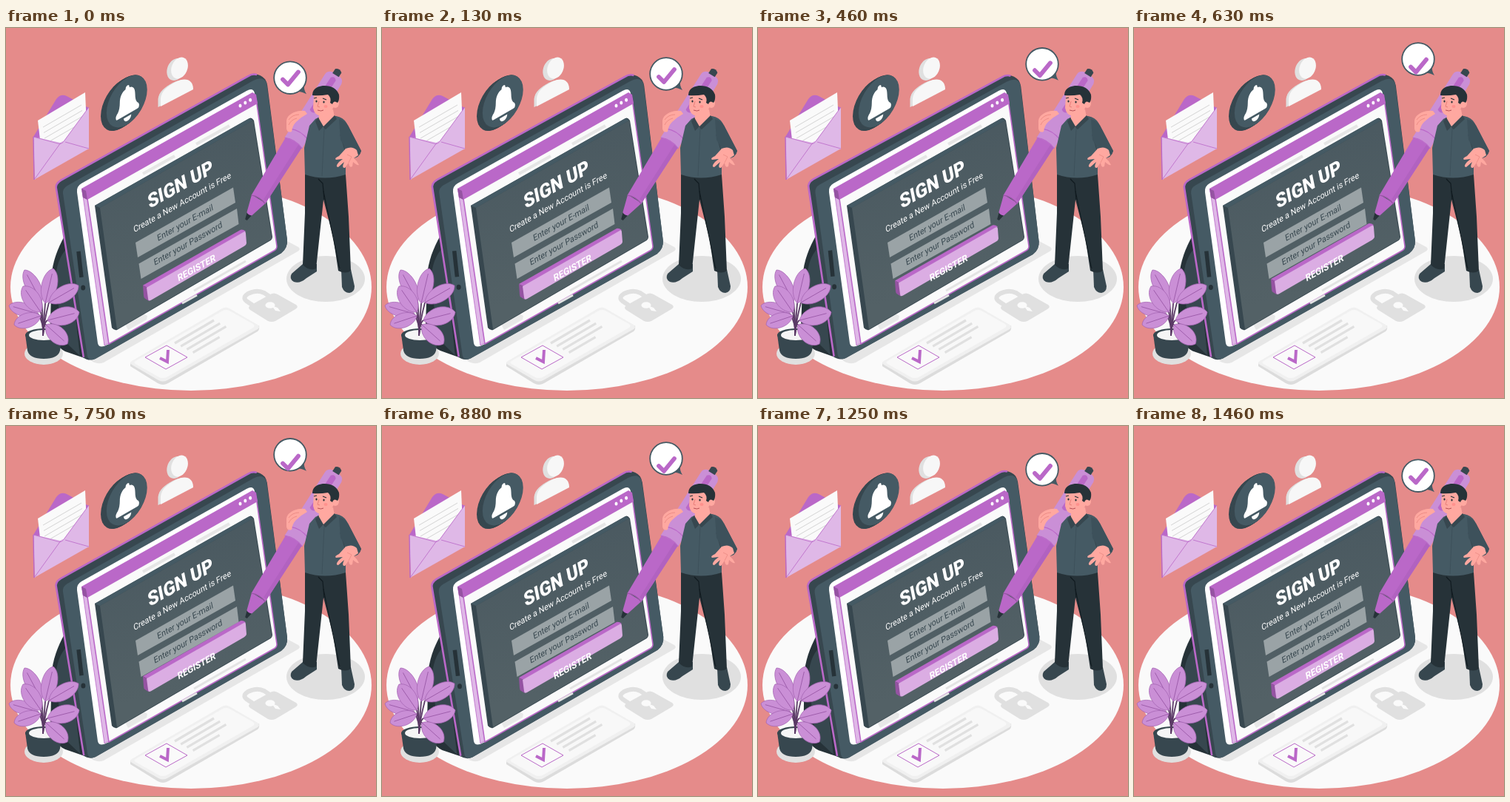
Animation, 500 px wide and 500 px high, one loop 1500 ms. Source, as an HTML page with a canvas:

```html
<!DOCTYPE html>
<html lang="en">
<head>
<meta charset="utf-8">
<title>Sign up</title>
<style>
html, body { margin: 0; width: 100%; height: 100%; overflow: hidden; background: #e58b8a; }
canvas { display: block; width: 500px; height: 500px; }
</style>
</head>
<body>
<canvas id="stage" width="500" height="500"></canvas>
<script>
const ctx = document.getElementById('stage').getContext('2d');
const LOOP = 1500;
const PURPLE = '#ba68c8', LILAC = '#ca8fd6', PALE = '#dfb8e7', PLUM = '#9553a2';
const SLATE = '#455a64', DARK = '#37474f', INK = '#263238', SKIN = '#ffa8a0', GREY = '#e0e0e0';

function shape(d, fill, stroke, width = 1) {
  const p = new Path2D(d);
  if (fill) { ctx.fillStyle = fill; ctx.fill(p); }
  if (stroke) { ctx.strokeStyle = stroke; ctx.lineWidth = width; ctx.stroke(p); }
}
const line = (d, color, width) => shape(d, null, color, width);

function oval(x, y, rx, ry, fill, stroke, width = 1, turn = 0) {
  ctx.beginPath();
  ctx.ellipse(x, y, rx, ry, turn, 0, Math.PI * 2);
  if (fill) { ctx.fillStyle = fill; ctx.fill(); }
  if (stroke) { ctx.strokeStyle = stroke; ctx.lineWidth = width; ctx.stroke(); }
}

function placed(matrix, draw) {
  ctx.save();
  ctx.transform(...matrix);
  draw();
  ctx.restore();
}
const lifted = (lift, draw) => placed([1, 0, 0, 1, 0, -lift], draw);

// Text lying in the plane of the tilted screen, centred on (x, y).
function label(text, x, y, font, color) {
  placed([0.866, -0.49, 0.2, 0.98, x, y], () => {
    ctx.font = font + ' Roboto, sans-serif';
    ctx.textAlign = 'center';
    ctx.textBaseline = 'alphabetic';
    ctx.fillStyle = color;
    ctx.fillText(text, 0, ctx.measureText('E').actualBoundingBoxAscent / 2);
  });
}

function floor() {
  ctx.fillStyle = '#e58b8a';
  ctx.fillRect(0, 0, 500, 500);
  oval(250, 350, 244, 140, '#fafafa');
  shape('M112 447L380 288L395 296Q399 299 394 302L132 452Q122 456 112 447Z', '#e6e6e6');
  oval(432, 339, 53, 31, GREY);
  oval(51, 440, 26, 15, GREY);
}

function card() {
  shape('M168 452V457L205 480Q212 484 219 480L340 410Q343 407 342 402Z', '#dcdcdc');
  shape('M170 450L292 379Q297 376 302 379L340 401Q344 404 340 407L218 476Q212 479 206 476L170 455Q166 453 170 450Z', '#f0f0f0');
  shape('M175 450L293 382Q297 380 302 382L334 400Q337 403 334 405L217 472Q212 474 207 472L175 454Q172 452 175 450Z', '#f8f8f8');
  shape('M188 445L217 429L245 445L216 461Z', '#fafafa', PURPLE, 1);
  line('M208 446L218 451L219 435', PURPLE, 4);
  for (let i = 0; i < 4; i++) {
    const x = 228 + i * 8.2, y = 426 + i * 4.2;
    line(`M${x} ${y}l${i === 3 ? 36 : 53} ${i === 3 ? -21 : -31}`, GREY, 3.2);
  }
}

function padlock() {
  line('M337 377L325 369Q319 364 327 359Q339 353 349 358L361 366', GREY, 6);
  shape('M330 375L357 360Q362 357 367 360L392 374Q396 377 391 380L364 396Q359 398 354 396L330 381Q326 378 330 375Z', GREY);
  oval(357, 374.5, 6.5, 4.3, '#fafafa');
  shape('M359 375L367 378L371 383L364 382Z', '#fafafa');
}

function tablet() {
  shape('M82 276C73 292 65 308 62 330L60 400Q64 430 80 437L106 446Z', INK);
  shape('M84 296C72 308 68 322 67 340L76 420L100 443Z', DARK);
  shape('M68 218Q66 211 74 206L327 65Q340 58 350 69Q352 72 353 77L380 286Q381 297 372 304L121 447Q112 451 104 445Z', DARK);
  shape('M77 224Q76 217 83 213L334 71Q347 64 352 74L380 286Q381 297 372 304L121 447Q112 451 110 443Z', SLATE);
  line('M105 445L68 218Q66 211 74 206L327 65Q333 61 339 63', PURPLE, 2.6);
  line('M98 302L102 337', INK, 5.5);
  oval(104.3, 351, 3, 3.5, INK);
}

function browser() {
  shape('M96 222Q95 214 102 210L325 85Q334 80 336 88L365 290Q366 298 360 301L137 428Q126 434 124 426Z', '#fff');
  shape('M103 220L110 224L140 425L133 429Z', PALE, PURPLE, 0.8);
  shape('M109 224L338 96L366 295Q366 299 362 301L139 427Z', '#fafafa', PURPLE, 1.6);
  shape('M102 217L333 87L338 90L340 102L110 232L104 229Z', PURPLE);
  shape('M102 217L108 220L110 232L104 229Z', PLUM);
  for (let i = 0; i < 3; i++) oval(316.5 + i * 6.8, 105 - i * 3.9, 2, 2.5, '#fff');
  line('M185 197L228 173M257 157L302 132', '#e6e6e6', 4);
  line('M254 355L324 315M238 372L258 361', '#e4e4e4', 3);
  shape('M161 400L186 386L191 389L190 394L165 408Z', '#e8e8e8');
}

function panel() {
  shape('M120 240L329 122Q332 120 335 125L360 282Q360 286 356 288L150 408Q146 409 143 405Z', DARK);
  shape('M120 240L329 122L334 125L127 243Z', SLATE);
  const tint = ctx.createLinearGradient(220, 160, 265, 350);
  tint.addColorStop(0, '#4b5a61');
  tint.addColorStop(1, '#536166');
  shape('M127 243L334 125L359 283Q359 286 356 287L150 407Z', tint);
  label('SIGN UP', 235.5, 210.5, '900 26px', '#fff');
  label('Create a New Account is Free', 238, 235.5, '11.6px', '#fff');
  shape('M175 290L307 215.5L310 236L178 310Z', '#9aa3a6');
  shape('M179.5 318.5L312 244L314.5 265L182.5 339Z', '#9aa3a6');
  label('Enter your E-mail', 242, 263, '11.6px', DARK);
  label('Enter your Password', 246, 291, '11.6px', DARK);
}

function button(lift) {
  lifted(lift, () => {
    shape('M185 348L317 273Q320 272 324 275L191 351Z', PURPLE);
    shape('M185 348L191 351L193 369L188 366Q186 365 186 362Z', PLUM);
    shape('M190 351L321 276Q324 274 324 278L325 291Q325 293 322 295L196 368Q192 370 192 366Z', '#dbade3');
  });
  label('REGISTER', 257.5, 324, 'bold 12.7px', '#fff');
}

function envelope() {
  shape('M37 147L68 96Q74 88 82 92L112 108L80 160Z', PURPLE);
  shape('M43 125L107 87L109 132L76 157L46 151Z', '#fafafa');
  for (let i = 0; i < 4; i++) line(`M${50 + i} ${134 + i * 7.5}l52 -30`, '#d4d4d4', 1);
  shape('M37 147L74 155L39 205Z', PALE);
  shape('M112 107L77 154L112 164Z', PALE);
  shape('M38 205L73 156Q76 151 80 154L112 163Z', PALE);
  line('M37 147L70 156Q75 158 79 152L112 107M38 205L74 155M80 154L112 163', PURPLE, 0.8);
  line('M37 147L38 205', PURPLE, 1.4);
}

function bell() {
  const plane = (x, y, draw) => placed([0.866, -0.5, 0, 1, x, y], draw);
  for (let i = 0; i <= 6; i++) plane(156 + i, 103 - i * 0.6, () => oval(0, 0, 32.3, 32.3, DARK));
  plane(163.3, 99, () => {
    oval(0, 0, 31.7, 31.7, SLATE);
    shape('M-17 16Q-18 12 -14 9Q-11 5 -11 -3C-11 -12 -7 -16 -2 -17Q-2 -21 1 -21Q4 -21 4 -17C10 -16 13 -11 13 -3Q13 5 16 9Q20 12 19 16Q19 18 16 18H-14Q-17 18 -17 16Z', '#fff');
    shape('M-5 21H7Q6 27 1 27Q-4 27 -5 21Z', '#fff');
  });
}

function profileIcon() {
  const bust = 'M209 106V95C210 85 218 79 229 73C243 66 253 70 253 83Z';
  placed([1, 0, 0, 1, -3.5, 1], () => {
    shape(bust, GREY);
    oval(233, 55, 11.5, 15.5, GREY, null, 0, 0.4);
  });
  shape(bust, '#f7f7f7');
  oval(234.5, 54, 10.6, 15, '#f7f7f7', null, 0, 0.4);
}

function bubble(lift, checkLift) {
  lifted(lift, () => {
    shape('M392 86Q401 87 406 90Q402 84 403 78Z', SLATE);
    oval(384, 68, 21.8, 21.8, '#fff', SLATE, 1.8);
  });
  ctx.lineCap = ctx.lineJoin = 'round';
  lifted(checkLift, () => line('M374 70L381 77L395 60', PURPLE, 5.8));
  ctx.lineCap = 'butt';
  ctx.lineJoin = 'miter';
}

// Drawn along its own axis, from the nib at the origin.
function pen() {
  const c = 0.528, s = -0.849;
  placed([c, s, -s, c, 324, 259], () => {
    shape('M0 -1L10 -4V4L0 2Z', INK);
    shape('M9 -4L33 -11V11L9 4Q7 0 9 -4Z', PURPLE);
    shape('M32 -11L128 -13V13L32 11Q36 0 32 -11Z', PURPLE);
    shape('M36 6L128 7V13L36 11Z', '#b162c0');
    line('M32 -11Q37 0 32 11', PLUM, 1.2);
    shape('M122 -14L224 -13Q232 -12 232 0Q232 12 224 13L122 14Q127 0 122 -14Z', LILAC);
    line('M122 -14Q128 0 122 14M136 -14Q142 0 136 14', PURPLE, 1.2);
    shape('M172 -5L224 -4Q229 0 224 4L172 3Q169 -1 172 -5Z', PURPLE);
    shape('M230 -5H237Q241 0 237 5H230Z', DARK);
  });
}

function man() {
  // Shoes and trousers
  shape('M401 319L386 332Q382 339 389 343Q397 346 406 338L420 329V319Z', DARK);
  shape('M453 326L454 350Q457 358 464 358Q471 357 471 349L466 326Z', DARK);
  shape('M404 197L404 250L401 320Q410 329 419 325L429 232L442 282L449 328Q459 333 466 328L463 255L459 198Z', INK);
  line('M430 232L428 210L422 204', '#111b20', 1.2);
  line('M429 220Q437 260 451 325', '#111b20', 1);
  // Torso and sleeve
  shape('M418 123Q428 117 446 119Q456 121 460 128L480 166Q478 176 467 176L459 164V198Q431 207 404 198L403 162L410 132Z', SLATE);
  line('M458 165L452 144', DARK, 1.2);
  line('M430 136L427 200', '#3b4f58', 0.8);
  shape('M450 123Q460 125 465 137L480 166Q478 175 467 176L452 151Z', '#3d515b');
  // Neck, head and hair
  shape('M424 112L442 110L444 121L429 135L422 125Z', SKIN);
  shape('M422 121L429 133L444 118L447 123L432 137L428 134L423 139L418 126Z', DARK);
  shape('M416 91Q416 84 428 84L444 87V105Q438 117 427 119Q417 119 415 108Z', SKIN);
  oval(445, 102, 5, 6, SKIN);
  shape('M414 91Q414 80 428 78Q445 77 450 90Q451 97 448 101Q443 97 441 103L438 101Q440 94 435 90Q424 92 414 91Z', INK);
  oval(419.5, 99, 1.1, 1.5, INK);
  oval(429.5, 100, 1.1, 1.5, INK);
  line('M416 95L420 94M428 95L433 97', INK, 1.2);
  line('M423 99L421 106L424 107', '#e87f7a', 1);
  line('M421 111Q426 113 429 111', '#b84f55', 1);
  oval(432, 106, 2.5, 2, '#ff918d');
  // Gripping hand
  shape('M404 112Q397 111 389 114Q380 118 379 125L379 136Q380 142 386 140Q387 132 392 127L399 121L407 116Z', SKIN);
  line('M382 124Q387 117 396 117M382 131Q385 124 393 122', '#e98983', 0.9);
  // Open hand
  shape('M459 163Q468 159 474 165L476 172L470 176Q474 179 477 185Q474 186 469 181L468 187Q464 190 463 182L458 189Q453 190 457 181L449 188Q444 188 450 181L455 177L446 178Q443 176 450 173Z', SKIN);
  line('M461 171L467 174L463 182', '#e98983', 0.8);
}

function leaf(x0, y0, x1, y1, width) {
  const len = Math.hypot(x1 - x0, y1 - y0), c = (x1 - x0) / len, s = (y1 - y0) / len;
  line(`M50 416Q51 398 ${x0} ${y0}`, '#5b3a66', 1.8);
  placed([c, s, -s, c, x0, y0], () => {
    shape(`M0 0C${len * .2} ${-width} ${len * .85} ${-width} ${len} 0C${len * .85} ${width} ${len * .2} ${width} 0 0Z`, LILAC, '#a565b3', 0.7);
    line(`M0 0H${len * .85}`, '#9857a6', 0.8);
  });
}

function plant() {
  shape('M26 414L29 436Q32 447 51 447Q70 447 73 436L76 414Z', DARK);
  oval(51, 415, 25, 9, DARK);
  oval(51, 415, 20, 7, '#f5f5f5');
  leaf(48, 370, 25, 327, 13);
  leaf(53, 372, 64, 325, 14);
  leaf(58, 371, 98, 348, 14);
  leaf(43, 386, 4, 375, 12);
  leaf(47, 384, 23, 349, 15);
  leaf(47, 389, 11, 401, 13);
  leaf(56, 395, 99, 384, 16);
  leaf(54, 401, 83, 427, 15);
}

// Piecewise linear: 0, up to 1 at mid-loop, back to 0.
const rise = p => 1 - Math.abs(2 * p - 1);
// Piecewise linear sway: 0, 1, 0, -1, 0.
const sway = p => 1 - Math.abs(((4 * p + 1) % 4) - 2);

function frame(now) {
  const p = ((now + 20) % LOOP) / LOOP, up = rise(p);
  floor();
  card();
  padlock();
  ctx.save();
  ctx.translate(206, 256);
  ctx.rotate(sway(p) * Math.PI / 180);
  ctx.translate(-206, -256);
  tablet();
  ctx.restore();
  browser();
  panel();
  button(10 * up);
  envelope();
  bell();
  profileIcon();
  bubble(30 * up, 20 * up);
  pen();
  man();
  plant();
}

let start;
function tick(now) {
  start ??= now;
  frame(now - start);
  requestAnimationFrame(tick);
}
requestAnimationFrame(tick);
</script>
</body>
</html>
```
